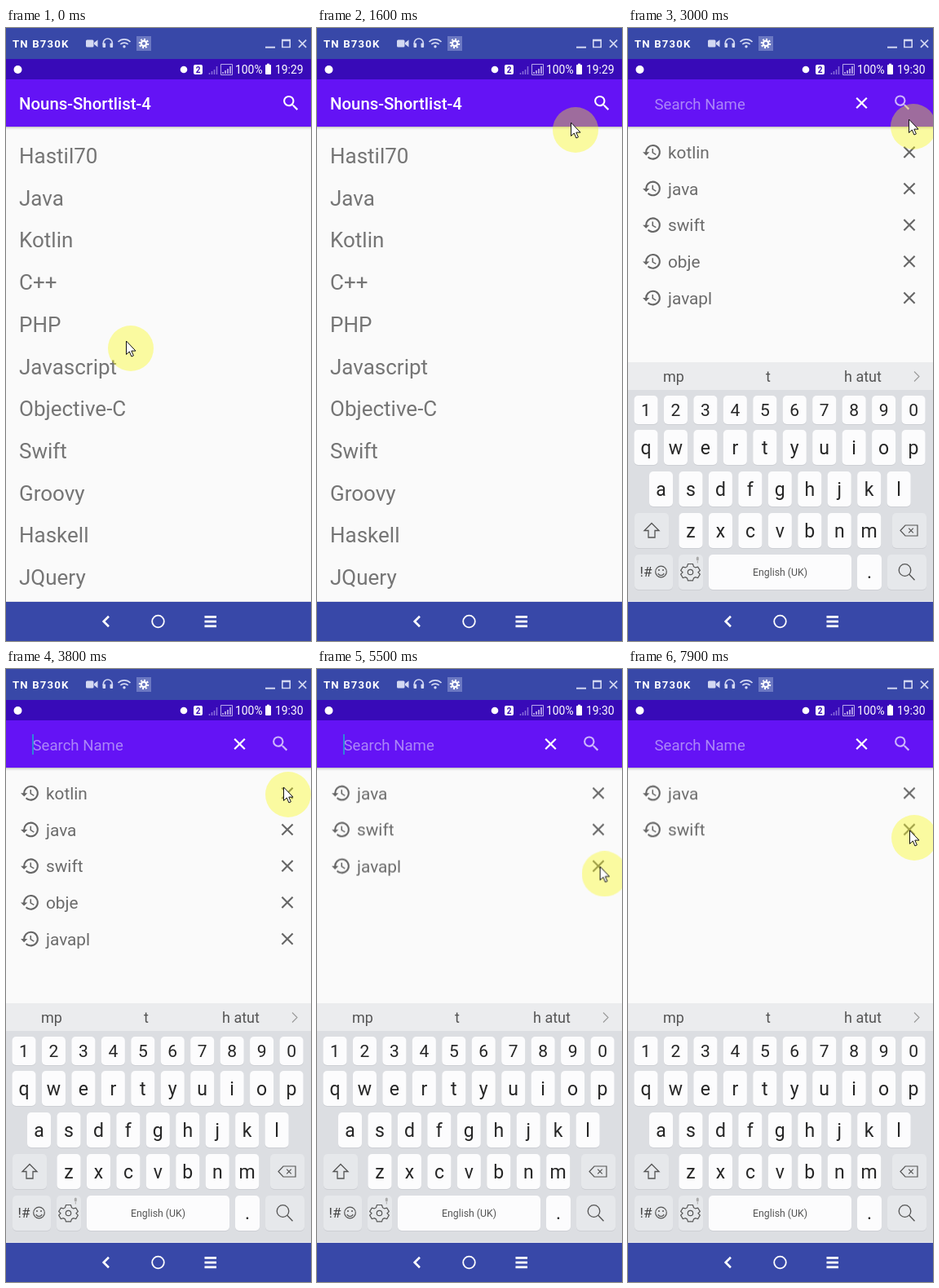
An HTML page that plays this animation: 374 px wide and 752 px high, repeating every 8 s.

```html
<!DOCTYPE html>
<html lang="en">
<head>
<meta charset="utf-8">
<title>Word list search</title>
<style>
  html, body { margin: 0; width: 100%; height: 100%; overflow: hidden; background: #fafafa; }
  svg { display: block; width: 374px; height: 752px; }
  text { font-family: Roboto, sans-serif; white-space: pre; }
  .mid { text-anchor: middle; }
  .line { fill: none; stroke: #fff; }

  .browse, .search, .row, .press, .up1, .up2, .keys { animation: 8s step-end infinite; }
  .browse { animation-name: leave; }
  .search { animation-name: enter; }
  .kotlin { animation-name: drop1; }
  .obje   { animation-name: drop2; }
  .javapl { animation-name: drop3; }
  .up1 { animation-name: up1; }
  .up2 { animation-name: up2; }
  .press { animation-name: press; }
  .keys { animation-name: keys; }
  .caret { animation: blink 1s -.6s step-end infinite; }
  .pointer { animation: move 8s steps(1) infinite; }

  @keyframes leave { 0% { opacity: 1 } 28.75%, 100% { opacity: 0 } }
  @keyframes enter { 0% { opacity: 0 } 28.75%, 100% { opacity: 1 } }
  @keyframes drop1 { 0% { opacity: 1 } 50%, 100% { opacity: 0 } }
  @keyframes drop2 { 0% { opacity: 1 } 65%, 100% { opacity: 0 } }
  @keyframes drop3 { 0% { opacity: 1 } 86.25%, 100% { opacity: 0 } }
  @keyframes up1 { 0% { transform: none } 50%, 100% { transform: translateY(-44.7px) } }
  @keyframes up2 { 0% { transform: none } 65%, 100% { transform: translateY(-44.7px) } }
  @keyframes press { 0% { opacity: 0 } 83.75% { opacity: .6 } 86.25%, 100% { opacity: 0 } }
  @keyframes blink { 0% { opacity: 1 } 50%, 100% { opacity: 0 } }
  @keyframes keys {
    0% { opacity: 0; transform: translateY(60px) }
    31.25% { opacity: .15; transform: translateY(60px) }
    32.5% { opacity: .4; transform: translateY(31.5px) }
    33.75% { opacity: .8; transform: translateY(9px) }
    35%, 100% { opacity: 1; transform: none }
  }
  /* every step lasts 100 ms */
  @keyframes move {
    0% { transform: translate(153px, 393px) }
    11.25% { transform: translate(153px, 393px); animation-timing-function: steps(3) }
    15% { transform: translate(205px, 320px); animation-timing-function: steps(2) }
    17.5% { transform: translate(275px, 195px); animation-timing-function: steps(2) }
    20% { transform: translate(317px, 125px); animation-timing-function: steps(2) }
    22.5% { transform: translate(346px, 106px); animation-timing-function: steps(2) }
    25% { transform: translate(350px, 104px); animation-timing-function: steps(6) }
    32.5% { transform: translate(343px, 102px); animation-timing-function: steps(2) }
    35% { transform: translate(343px, 104px); animation-timing-function: steps(2) }
    37.5% { transform: translate(350px, 121px); animation-timing-function: steps(4) }
    42.5% { transform: translate(348px, 149px); animation-timing-function: steps(2) }
    45% { transform: translate(346px, 154px) }
    47.5% { transform: translate(346px, 154px); animation-timing-function: steps(3) }
    51.25% { transform: translate(347px, 157px); animation-timing-function: steps(4) }
    56.25% { transform: translate(361px, 196px); animation-timing-function: steps(4) }
    61.25% { transform: translate(354px, 235px); animation-timing-function: steps(3) }
    65% { transform: translate(352px, 246px); animation-timing-function: steps(5) }
    71.25% { transform: translate(353px, 255px); animation-timing-function: steps(7) }
    80% { transform: translate(353px, 249px) }
    86.25% { transform: translate(353px, 249px); animation-timing-function: steps(4) }
    91.25% { transform: translate(340px, 195px); animation-timing-function: steps(3) }
    95% { transform: translate(340px, 198px) }
    96.25% { transform: translate(340px, 198px); animation-timing-function: steps(2) }
    98.75%, 100% { transform: translate(351px, 207px) }
  }
</style>
</head>
<body>
<svg id="stage" viewBox="0 0 374 752"></svg>
<script>
const SEARCH = 'M15.5 14h-.79l-.28-.27A6.47 6.47 0 0 0 16 9.5 6.5 6.5 0 1 0 9.5 16c1.61 0 3.09-.59 4.23-1.57l.27.28v.79l5 4.99L20.49 19zm-6 0a4.5 4.5 0 1 1 0-9 4.5 4.5 0 0 1 0 9z';
const HISTORY = 'M13 3a9 9 0 0 0-9 9H1l3.89 3.89.07.14L9 12H6a7 7 0 1 1 7 7c-1.93 0-3.68-.79-4.94-2.06l-1.42 1.42A9 9 0 1 0 13 3zm-1 5v5l4.28 2.54.72-1.21-3.5-2.08V8z';

const text = (s, x, y, size, fill, more = '') =>
  `<text x="${x}" y="${y}" font-size="${size}" fill="${fill}" ${more}>${s}</text>`;
const rect = (x, y, w, h, fill, r = 0) =>
  `<rect x="${x}" y="${y}" width="${w}" height="${h}" rx="${r}" fill="${fill}"/>`;
const icon = (d, x, y, k, fill) =>
  `<path d="${d}" transform="translate(${x} ${y}) scale(${k})" fill="${fill}"/>`;
const line = (d, w, color = '#fff') =>
  `<path d="${d}" fill="none" stroke="${color}" stroke-width="${w}"/>`;
const cross = (x, y, r, w, color) =>
  line(`M${x - r} ${y - r}l${2 * r} ${2 * r}m0 ${-2 * r}l${-2 * r} ${2 * r}`, w, color);
const disc = (x, y, r, fill) => `<circle cx="${x}" cy="${y}" r="${r}" fill="${fill}"/>`;
const ring = (x, y, r, w, color) =>
  `<circle cx="${x}" cy="${y}" r="${r}" fill="none" stroke="${color}" stroke-width="${w}"/>`;
const group = (cls, ...parts) => `<g class="${cls}">${parts.join('')}</g>`;

// Toothed wheel: dashed outer ring around a solid one
const gear = (x, y, r, w, color) =>
  ring(x, y, r, w, color) +
  `<circle cx="${x}" cy="${y}" r="${r + w * .9}" fill="none" stroke="${color}" stroke-width="${w}"
    pathLength="16" stroke-dasharray="1"/>`;

function windowBar() {
  return rect(0, 0, 374, 38, '#3848a8') +
    text('TN B730K', 8, 24, 13.2, '#fff', 'font-weight="700" letter-spacing="1.15"') +
    rect(98, 14.5, 9.5, 9, '#d3d8f2', 1.5) + '<path d="M108 18l4.5-3.5v9L108 20z" fill="#d3d8f2"/>' +
    line('M119.3 20v-1.5a5.5 5.5 0 0 1 11 0V20', 1.6, '#d3d8f2') +
    rect(118.5, 18.5, 3.6, 5.5, '#d3d8f2', 1) + rect(127.5, 18.5, 3.6, 5.5, '#d3d8f2', 1) +
    line('M137.5 17a10.5 10.5 0 0 1 15 0M140.3 20a6.7 6.7 0 0 1 9.4 0', 1.7, '#d3d8f2') +
    disc(145, 22.7, 1.7, '#d3d8f2') +
    rect(160, 10, 18, 18, '#6b78c2') + gear(169, 19, 3.2, 2.2, '#fff') +
    line('M318 23.7h12', 2, '#d3d8f2') +
    line('M338.8 14.5h9.4v9h-9.4zM338 15.5h11', 1.6, '#d3d8f2') +
    cross(363.5, 19.3, 4.6, 1.7, '#d3d8f2');
}

function statusBar() {
  const time = s => text(s, 330, 56.3, 13.9, '#fff');
  return rect(0, 38, 374, 25, '#380ab8') +
    disc(14.5, 51, 5, '#fff') + disc(218, 51, 4.3, '#fff') +
    rect(230, 45, 11, 12, '#fff', 2) +
    text('2', 235.5, 54.6, 10, '#380ab8', 'class="mid" font-weight="700"') +
    line('M249.5 57v-2M252.5 57v-4M255.5 57v-6M258.5 57V47', 1.5, '#8a70dc') +
    line('M263.5 44.5h14v13h-14z', 1, '#b9a9ec') +
    line('M266 56v-2M269 56v-4M272 56v-6M275 56v-9', 1.5, '#cfc4f2') +
    text('100%', 281, 56.3, 13.9, '#fff') +
    rect(318, 45, 7, 12, '#fff', 1) + rect(320, 43.7, 3, 2, '#fff') +
    group('browse', time('19:29')) + group('search', time('19:30'));
}

function browse() {
  const words = ['Hastil70', 'Java', 'Kotlin', 'C++', 'PHP', 'Javascript',
    'Objective-C', 'Swift', 'Groovy', 'Haskell', 'JQuery'];
  return group('browse',
    text('Nouns-Shortlist-4', 16, 100, 20.4, '#fff', 'font-weight="500"'),
    icon(SEARCH, 337, 79.8, 1.03, '#fff'),
    ...words.map((w, i) => text(w, 16, 166 + i * 51.7, 26, '#757575')));
}

function row(word, i) {
  const y = 152.3 + i * 44.7;
  return group('row ' + word,
    icon(HISTORY, 17, y - 12.5, 1.04, '#666'),
    text(word, 49, y + 7.7, 20.8, '#6b6b6b'),
    cross(345, y, 6.6, 2.1, '#666'));
}

function search() {
  return group('search',
    text('Search Name', 32.5, 99.5, 18.6, '#ab86f8'),
    `<g class="caret">${rect(32, 80, 2, 25, '#2f86d8')}</g>`,
    cross(286.5, 92, 6.3, 2.2, '#fff'),
    icon(SEARCH, 324, 79.3, 1.03, '#cdb6fc'),
    row('kotlin', 0),
    group('up1', row('java', 1), row('swift', 2), row('obje', 3),
      group('up2', row('javapl', 4))),
    group('press', ring(346, 241, 7, 3, '#555')));
}

function keyboard() {
  const ink = '#262626', soft = '#e6e8eb', dim = '#555';
  const key = (x, y, w, h, fill = '#fcfcfd') =>
    rect(x, y + 1, w, h, '#cdcfd4', 5) + rect(x, y, w, h, fill, 5);
  const keyRow = (chars, x, y, h, size, base) => [...chars].map((c, i) => {
    const cx = x + i * 36.45;
    return key(cx - 14.5, y, 29, h) + text(c, cx, base, size, ink, 'class="mid"');
  }).join('');
  const word = (s, x) => text(s, x, 434, 18, '#555', 'class="mid"');
  return group('keys',
    rect(0, 410, 374, 34, '#ebecee'), rect(0, 444, 374, 320, '#dcdee2'),
    word('mp', 56), word('t', 172), word('h atut', 288),
    line('M351 421.5l6 6-6 6', 1.1, '#999'),
    keyRow('1234567890', 22, 451, 35, 21, 475.5),
    keyRow('qwertyuiop', 22, 493, 43, 23, 522.5),
    keyRow('asdfghjkl', 40.5, 544, 43, 23, 573.5),
    keyRow('zxcvbnm', 77, 595, 43, 23, 624.5),
    key(8, 595, 42, 43, soft), key(324, 595, 42, 43, soft),
    line('M29 607.5l9 9h-5v8.500h-8v-8.500h-5z', 1.3, dim),
    line('M334 616.500l6-6.500h15v13h-15z', 1.2, dim), cross(347, 616.5, 2.8, 1.2, dim),
    key(8, 646, 47, 43, soft), key(62, 646, 30, 43, soft), key(99, 646, 175, 43),
    key(281, 646, 30, 43), key(318, 646, 48, 43, soft),
    text('!#', 14.5, 673, 17, '#444'),
    ring(40.5, 667, 6.8, 1.2, dim), disc(38, 665, 1, dim), disc(43, 665, 1, dim),
    line('M36.800 669a4 4 0 0 0 7.400 0', 1.1, dim),
    ring(76.5, 667.5, 3.2, 1.2, dim), 
    line('M73.5 657.500h6l1 3.200 2 1.200 3.200-.8 2.600 4.400-2.300 2.300 2.300 2.300-2.600 4.400-3.200-.8-2 1.200-1 3h-6l-1-3-2-1.200-3.200.8-2.600-4.400 2.300-2.300-2.300-2.300 2.600-4.400 3.200.8 2-1.200z', 1.2, dim),
    rect(83.800, 648.500, 3, 5, '#aaa', 1.5), line('M85.300 654v2.500', 1, '#aaa'),
    text('English (UK)', 186.5, 671.5, 12.3, dim, 'class="mid"'),
    text('.', 296, 675, 23, ink, 'class="mid"'),
    ring(339.5, 665, 7.3, 1.3, dim), line('M344.800 670.300l6.700 7', 1.4, dim));
}

function navBar() {
  return rect(0, 703, 374, 1, '#e3e4ea') + rect(0, 704, 374, 48, '#3848a8') +
    line('M126 721.8l-6.300 6.200 6.300 6.200', 2.6) + ring(186.5, 728, 7.3, 1.8, '#fff') +
    [721, 726.700, 732.400].map(y => rect(243.500, y, 14.500, 2.800, '#fff')).join('');
}

const pointer = group('pointer',
  disc(0, 0, 28, 'rgba(250,250,20,.39)'),
  '<path d="M-5.500-9v16.500L-1.700 4l2.600 6 2.500-1.100L.8 3.100H6z" fill="#fff" stroke="#111"/>');

const shade = [.2, .11, .05, .02].map((a, i) => rect(0, 121 + i, 374, 1, `rgba(0,0,0,${a})`)).join('');

document.getElementById('stage').innerHTML =
  rect(0, 0, 374, 752, '#fafafa') + rect(0, 63, 374, 58, '#6413f5') + shade +
  browse() + search() + keyboard() + windowBar() + statusBar() + navBar() + pointer;
</script>
</body>
</html>
```
